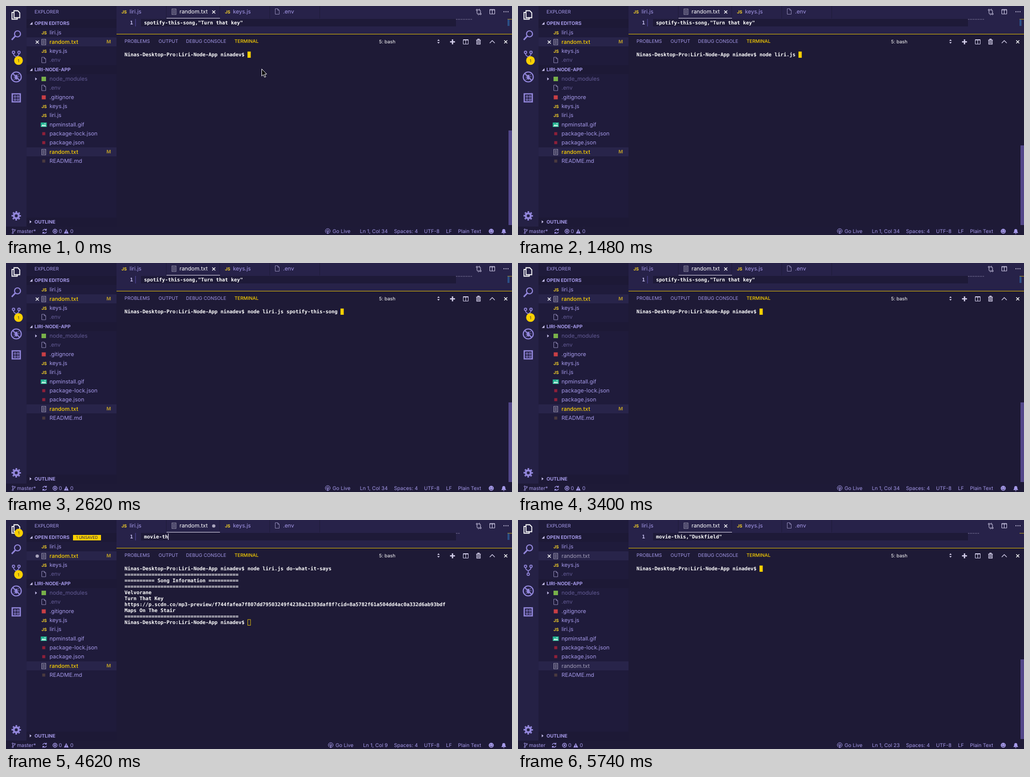
Write an HTML page that moves like this. It is 1012 px wide and 460 px high and loops after 5760 ms.

```html
<!DOCTYPE html>
<html lang="en">
<head>
<meta charset="utf-8">
<title>Terminal demo</title>
<style>
  html, body { margin: 0; width: 100%; height: 100%; overflow: hidden; background: #1e1a36; }
  svg { display: block; }
  text { font: 11px Inter, "Open Sans", sans-serif; fill: #a599e9; white-space: pre; text-rendering: geometricPrecision; }
  .cap { font-size: 9.5px; }
  .head { font-size: 9.5px; font-weight: 700; }
  .tab { font-size: 9.4px; }
  .mono { font: bold 10px "DejaVu Sans Mono", "Liberation Mono", monospace; letter-spacing: -.02px; fill: #fff; }
  .stat { font-size: 10.1px; }
  .badge { font-size: 8px; fill: #28234a; text-anchor: middle; }
  .js { font-size: 8.5px; font-weight: 700; fill: #f5d028; }
  .mark { font-size: 9.5px; font-weight: 700; fill: #b5982b; }
  .dim { fill: #625a94; }
  .white { fill: #fff; }
  .gold { fill: #fad000; }
  .hot { fill: #fad000; font-weight: 500; }
  .calm { fill: #a19cb8; }
  .line { fill: none; stroke: #a599e9; }
  .pale { fill: none; stroke: #d5d0ec; }
</style>
</head>
<body>
<svg id="stage" width="1012" height="460" viewBox="0 0 1012 460">
  <defs>
    <path id="page" d="M-4-5.5h5l3 3v8h-8zM1-5.5v3h3" fill="none" stroke="#8d86b3"/>
    <g id="doc"><rect x="-4" y="-5.5" width="8" height="11" fill="none" stroke="#a19db4"/><path d="M-2.5-3h5M-2.5-1h5M-2.5 1h5M-2.5 3h5" stroke="#a19db4" stroke-width=".8"/></g>
    <g id="pic"><rect x="-6" y="-4.5" width="12" height="9" fill="#24b391"/><path d="M-5 3l3.5-4 2 2.5 2-2L5 3z" fill="#d8f5ec"/><circle cx="2.5" cy="-2" r="1" fill="#d8f5ec"/></g>
    <rect id="green" x="-4.5" y="-4.5" width="9" height="9" fill="#78b04a"/>
    <rect id="red" x="-4" y="-4" width="8" height="8" fill="#c93f45"/>
    <rect id="crimson" x="-3" y="-3" width="6" height="6" fill="#8f2039"/>
    <rect id="brown" x="-3" y="-3" width="6" height="6" fill="#4a3a3f"/>
    <path id="open" d="M-3 2.5h5.5v-5.5z" fill="#c9c2ee"/>
    <path id="shut" d="M-1.5-3l3.5 3-3.5 3z" fill="#c9c2ee"/>
    <path id="cross" d="M-3-3l6 6M3-3l-6 6" stroke="#fff" stroke-width="1.4"/>
    <path id="split" d="M-5-4.5h10v9h-10zM0-4.5v9M-5-3.5h10" fill="none" stroke="#d5d0ec"/>
  </defs>

  <!-- backgrounds -->
  <rect width="1012" height="460" fill="#1e1a36"/>
  <rect width="41" height="443" fill="#252145"/>
  <rect x="41" width="180" height="443" fill="#1f1b3b"/>
  <rect x="41" y="26" width="180" height="18" fill="#1d1936"/>
  <rect x="41" y="119" width="180" height="18" fill="#1d1936"/>
  <rect x="41" y="425" width="180" height="18" fill="#1d1936"/>
  <rect x="41" y="63" width="180" height="18" fill="#28244a"/>
  <rect x="41" y="284" width="180" height="18" fill="#28244a"/>
  <rect x="221" width="791" height="56" fill="#272249"/>
  <path d="M320.5 0v25M427.5 0v25M527.5 0v25M627.5 0v25" stroke="#1f1b3a"/>
  <rect x="321" y="24" width="107" height="1" fill="#d9d5e2"/>
  <rect x="270" y="26" width="630" height="15" fill="#1e1a38"/>
  <rect x="221" y="56" width="791" height="1" fill="#e0bb08"/>
  <rect y="443" width="1012" height="17" fill="#1e1a37"/>

  <!-- activity bar -->
  <g fill="none" stroke="#fff" stroke-width="1.8"><path d="M16 9.5h7.5l4 4v10H16z"/><path d="M15 13h-3v13.5h10.500v-3"/></g>
  <g fill="none" stroke="#9387dc" stroke-width="2.2">
    <circle cx="23" cy="56" r="6"/><path d="M18.500 60.500L11.500 68" stroke-width="3"/>
    <g stroke-width="1.7"><circle cx="15" cy="93" r="2.4"/><circle cx="26" cy="93" r="2.4"/><circle cx="20.500" cy="109" r="2.4"/><path d="M15 95.500q0 4 5.500 6.500q5.500-2.500 5.500-6.500M20.500 102v4.500"/></g>
    <circle cx="20.500" cy="142.500" r="10"/><path d="M13.500 135.500l14 14"/>
    <path d="M15 139h3M15 143h3M15 147h3M23 138h3M24 142h3M23 147h3" stroke-width="1.2"/>
    <ellipse cx="20.500" cy="143" rx="3" ry="5" fill="#9387dc" stroke="none"/>
    <path d="M12.500 176.500h16v16h-16z" stroke-width="2.600"/>
    <path d="M16.500 180.500h3v3h-3zM22.500 180.500h3v3h-3zM16.500 186.500h3v3h-3zM22.500 186.500h3v3h-3z" stroke-width="1.200"/>
    <circle cx="20.500" cy="421.500" r="5" stroke-width="4"/>
    <circle cx="20.500" cy="421.500" r="8" stroke-width="3" stroke-dasharray="3.140 3.143" stroke-dashoffset="1.570"/>
  </g>
  <g id="gitBadge"><circle cx="25" cy="109.500" r="8.700" class="gold"/><text x="25" y="112.500" class="badge">1</text></g>
  <g id="fileBadge"><circle cx="25.500" cy="26" r="8.500" class="gold"/><text x="25.500" y="29" class="badge">1</text></g>

  <!-- sidebar -->
  <text x="57" y="15" class="cap">EXPLORER</text>
  <use href="#open" x="50.500" y="35"/><text x="57" y="38" class="head">OPEN EDITORS</text>
  <g id="unsaved"><rect x="134" y="30" width="56" height="11" class="gold"/><text x="162" y="38.300" class="badge">1 UNSAVED</text></g>
  <use href="#open" x="50.500" y="128"/><text x="57" y="131" class="head">LIRI-NODE-APP</text>
  <use href="#shut" x="60" y="146.500"/>
  <use href="#shut" x="49" y="433.500"/><text x="57" y="437" class="head">OUTLINE</text>
  <g id="files"></g>
  <g id="marks"><text x="201" y="75" class="mark">M</text><text x="201" y="296" class="mark">M</text></g>
  <g class="saved"><use href="#cross" x="62.500" y="72.500"/><use href="#cross" x="415.500" y="12"/></g>
  <g class="dirty" fill="#aaa5bd"><circle cx="62.500" cy="72.500" r="3.300"/><circle cx="415.500" cy="12" r="3.300"/></g>

  <!-- editor -->
  <text x="231" y="14.500" class="js">JS</text><text x="247" y="15">liri.js</text>
  <use href="#doc" x="336" y="11.500"/><text x="347" y="15" class="white">random.txt</text>
  <text x="438" y="14.500" class="js">JS</text><text x="454" y="15">keys.js</text>
  <use href="#page" x="542.500" y="11"/><text x="554" y="15">.env</text>
  <g class="pale">
    <circle cx="942" cy="8" r="1.500"/><circle cx="949" cy="16" r="1.500"/><path d="M942 9.500v5q0 2 3 2M949 14.500v-5q0-2-3-2M944.500 14.500l2 2-2 2M947 5.500l-2 2 2 2"/>
  </g>
  <use href="#split" x="972.500" y="11.500"/>
  <g fill="#d5d0ec"><circle cx="996" cy="11.500" r="1.100"/><circle cx="1000" cy="11.500" r="1.100"/><circle cx="1004" cy="11.500" r="1.100"/></g>
  <text x="248" y="37" class="mono" style="fill:#c6bff0">1</text>
  <rect id="gutter" x="258" y="26" width="2" height="15" fill="#3d3779"/>
  <text id="source" x="276" y="37" class="mono"></text>
  <rect id="caret" y="27" width="1.200" height="13" fill="#e8e4f5"/>
  <path id="mini" stroke="#8d87a8" stroke-dasharray="2 1 1 1"/>
  <rect x="1003" y="26" width="9" height="1.200" fill="#a58c25"/>
  <rect id="ruler" x="1003" y="27" width="4" height="13" fill="#2b4f86"/>

  <!-- panel -->
  <text x="237" y="74" class="tab">PROBLEMS</text>
  <text x="305" y="74" class="tab">OUTPUT</text>
  <text x="360" y="74" class="tab">DEBUG CONSOLE</text>
  <text x="457" y="74" class="tab hot">TERMINAL</text>
  <text id="shell" x="746" y="75" class="cap white" font-weight="500"></text>
  <path d="M862.500 70l2.500-3 2.500 3zM862.500 72.500l2.500 3 2.500-3z" fill="#d5d0ec"/>
  <path d="M888 72h10M893 67v10" class="pale" stroke-width="2.600"/>
  <use href="#split" x="919.500" y="72"/>
  <path d="M940.500 68.500h9M943.500 68v-1.500h3V68M941.500 69v7.500h7V69M943.800 70v5M946.200 70v5" class="pale" stroke-width="1.300"/>
  <path d="M967.500 74.500l5-5 5 5" class="pale" stroke-width="1.300"/>
  <use href="#cross" x="999.500" y="72"/>
  <g id="term"></g>
  <rect id="cursor" width="6.500" height="12.500" fill="#fad000"/>
  <rect id="hollow" width="5.500" height="11.500" fill="none" stroke="#d9b60c"/>
  <rect id="thumb" x="1005" width="7" fill="#524789"/>
  <path id="mouse" d="M511.500 126.500v14.200l3.300-3 2.400 5.500 2.300-1-2.400-5.300h4.400z" fill="#000" stroke="#fff"/>

  <!-- status bar -->
  <g class="line"><circle cx="13.500" cy="449" r="1.300"/><circle cx="13.500" cy="456" r="1.300"/><circle cx="17.500" cy="450" r="1.300"/><path d="M13.500 450.500v4M17.500 451.500q0 2-4 2.500"/></g>
  <text id="branch" x="22" y="456" class="stat"></text>
  <g id="sync">
    <path class="line" stroke-width="1.300" d="M73.500 451.500a4 4 0 0 1 7-1.500M81 453.500a4 4 0 0 1-7 1.500M80.800 447.500v2.800H78M73.700 457.500v-2.800h2.800"/>
    <circle cx="98" cy="452.500" r="4" class="line" stroke-width="1.400"/><path d="M96.300 450.800l3.400 3.400M99.700 450.800l-3.400 3.400" class="line" stroke-width="1.300"/>
    <text x="105.500" y="456" class="stat">0</text>
    <path d="M120.500 448l4.700 9h-9.400z" fill="#a599e9"/><path d="M120.500 451v3M120.500 455v1" stroke="#1e1a37"/>
    <text x="128.500" y="456" class="stat">0</text>
  </g>
  <g id="live">
    <g class="line"><circle cx="643.500" cy="452" r="4.800"/><circle cx="643.500" cy="452" r="2.200"/><path d="M643.500 452v6"/></g>
    <text x="653" y="456" class="stat">Go Live</text>
  </g>
  <text id="place" x="763.500" y="456" class="stat" text-anchor="end"></text>
  <text x="776" y="456" class="stat">Spaces: 4</text>
  <text x="836" y="456" class="stat">UTF-8</text>
  <text x="880" y="456" class="stat">LF</text>
  <text x="904" y="456" class="stat">Plain Text</text>
  <circle cx="970.500" cy="452.500" r="5" fill="#a599e9"/><path d="M968.500 450v1.500M972.500 450v1.500M967.500 453.500q3 3.500 6 0" fill="none" stroke="#1e1a37"/>
  <path d="M990.500 456h10q-2-2-2-5a3 3 0 0 0-6 0q0 3-2 5zM994 457h3v1h-3z" fill="#a599e9"/>
</svg>
<script>
const LOOP = 5760, STEP = 20, CHAR = 6, LEFT = 237;
const $ = id => document.getElementById(id);
const NS = 'http://www.w3.org/2000/svg';

function add(parent, tag, attrs, text = '') {
  const el = document.createElementNS(NS, tag);
  for (const key in attrs) el.setAttribute(key, attrs[key]);
  el.textContent = text;
  return parent.appendChild(el);
}

// File rows: centre y, icon, name, class
const rows = [
  [53, 'js', 'liri.js'], [72, 'doc', 'random.txt', 'hot'], [90, 'js', 'keys.js'], [108, 'page', '.env', 'dim'],
  [146, 'green', 'node_modules', 'dim'], [164, 'page', '.env', 'dim'], [183, 'red', '.gitignore'],
  [201, 'js', 'keys.js'], [219, 'js', 'liri.js'], [238, 'pic', 'npminstall.gif'],
  [256, 'crimson', 'package-lock.json'], [274, 'crimson', 'package.json'],
  [293, 'doc', 'random.txt', 'hot'], [311, 'brown', 'README.md']
];
for (const [y, icon, name, cls = ''] of rows) {
  if (icon === 'js') add($('files'), 'text', { x: 71, y: y + 3.8, class: 'js' }, 'JS');
  else add($('files'), 'use', { href: '#' + icon, x: 75.5, y: y + .5 });
  add($('files'), 'text', { x: 87, y: y + 4, class: cls }, name);
}
const changed = document.querySelectorAll('#files .hot');

const PROMPT = 'Ninas-Desktop-Pro:Liri-Node-App ninadev$ ';
const RULE = '='.repeat(38), BAR = '='.repeat(10);
const song = [
  RULE, `${BAR} Song Information ${BAR}`, RULE, 'Velvorane', 'Turn That Key',
  'https://p.scdn.co/mp3-preview/f744fafea7f807dd79503249f4238a21393daf8f?cid=8a5782f61a504dd4ac0a332d6ab93bdf',
  'Maps On The Stair', RULE
];

// Each session ends with a cleared screen; keys are [start, end, text]
const sessions = [
  { from: 0, keys: [[60, 660, 'node liri.js concert-this 7vern']], run: 680, print: 720, done: 860,
    out: ['Doverfield Arena', 'Fenwel Holt'], clear: [1000, 1100, 'clear'] },
  { from: 1140, keys: [[1200, 1460, 'node liri.js '], [1520, 2600, 'spotify-this-song '], [2640, 2900, 'turn that key']],
    run: 2920, print: 3000, done: 3040, out: song, clear: [3200, 3300, 'clear'] },
  { from: 3340, keys: [[3440, 4000, 'node liri.js do-what-it-says']],
    run: 4020, print: 4120, done: 4160, out: song, clear: [5300, 5400, 'clear'] },
  { from: 5440, keys: [], run: LOOP }
];
const OLD = 'spotify-this-song,"Turn that key"', NEW = 'movie-this,"Duskfield"';
const FOCUS = 4260, ERASE = 4400, WRITE = 4460, SAVE = 4960, CLEAN = 5040, BACK = 5140;

function typed([start, end, text], t) {
  const part = Math.max(0, Math.min(1, (t - start) / (end - start)));
  return text.slice(0, Math.floor(part * text.length + 1e-6));
}

function screen(s, t) {
  const lines = [PROMPT + s.keys.map(k => typed(k, t)).join('')];
  if (t >= s.run) {
    if (t >= s.print) lines.push(...s.out);
    lines.push(t >= s.done ? PROMPT + typed(s.clear, t) : '');
  }
  return lines;
}

const slots = Array.from({ length: 11 }, (_, i) => add($('term'), 'text', { x: LEFT, y: 101 + i * 12, class: 'mono' }));
const put = (el, text) => { if (el.textContent !== text) el.textContent = text; };
const show = (el, on) => { el.style.display = on ? '' : 'none'; };
const set = (id, attrs) => { for (const key in attrs) $(id).setAttribute(key, attrs[key]); };

function draw(t) {
  const s = sessions.filter(x => t >= x.from).pop();
  const lines = screen(s, t);
  const editing = t >= FOCUS && t < BACK;
  slots.forEach((el, i) => put(el, lines[i] || ''));
  const x = LEFT + lines[lines.length - 1].length * CHAR, y = 91.5 + (lines.length - 1) * 12;
  set('cursor', { x, y });
  set('hollow', { x: x + .5, y: y + .5 });
  show($('cursor'), !editing);
  show($('hollow'), editing);
  put($('shell'), t >= s.run && t < s.done ? '5: node' : '5: bash');

  const top = t < 1140 ? 250 : 280;
  set('thumb', { y: top, height: 440 - top });
  show($('thumb'), !editing);
  show($('mouse'), t < 60);

  const text = t < ERASE ? OLD : typed([WRITE, WRITE + NEW.length * STEP, NEW], t);
  put($('source'), text);
  set('caret', { x: 276 + text.length * CHAR });
  show($('caret'), editing);
  set('mini', { d: `M900 26.8h${text.length}` });

  const dirty = t >= ERASE && t < SAVE, modified = t < CLEAN;
  for (const el of document.querySelectorAll('.dirty, #unsaved, #fileBadge')) show(el, dirty);
  show(document.querySelector('.saved'), !dirty);
  for (const id of ['gitBadge', 'marks', 'gutter', 'ruler']) show($(id), modified);
  changed.forEach(el => el.setAttribute('class', modified ? 'hot' : 'calm'));
  put($('branch'), modified ? 'master*' : 'master');
  set('sync', { transform: `translate(${modified ? 0 : -5})` });
  const col = text.length + 1;
  put($('place'), `Ln 1, Col ${col}`);
  set('live', { transform: `translate(${col < 10 ? 6 : 0})` });
}

function tick() {
  draw(Math.floor(performance.now() % LOOP / STEP) * STEP);
  requestAnimationFrame(tick);
}
tick();
</script>
</body>
</html>
```
